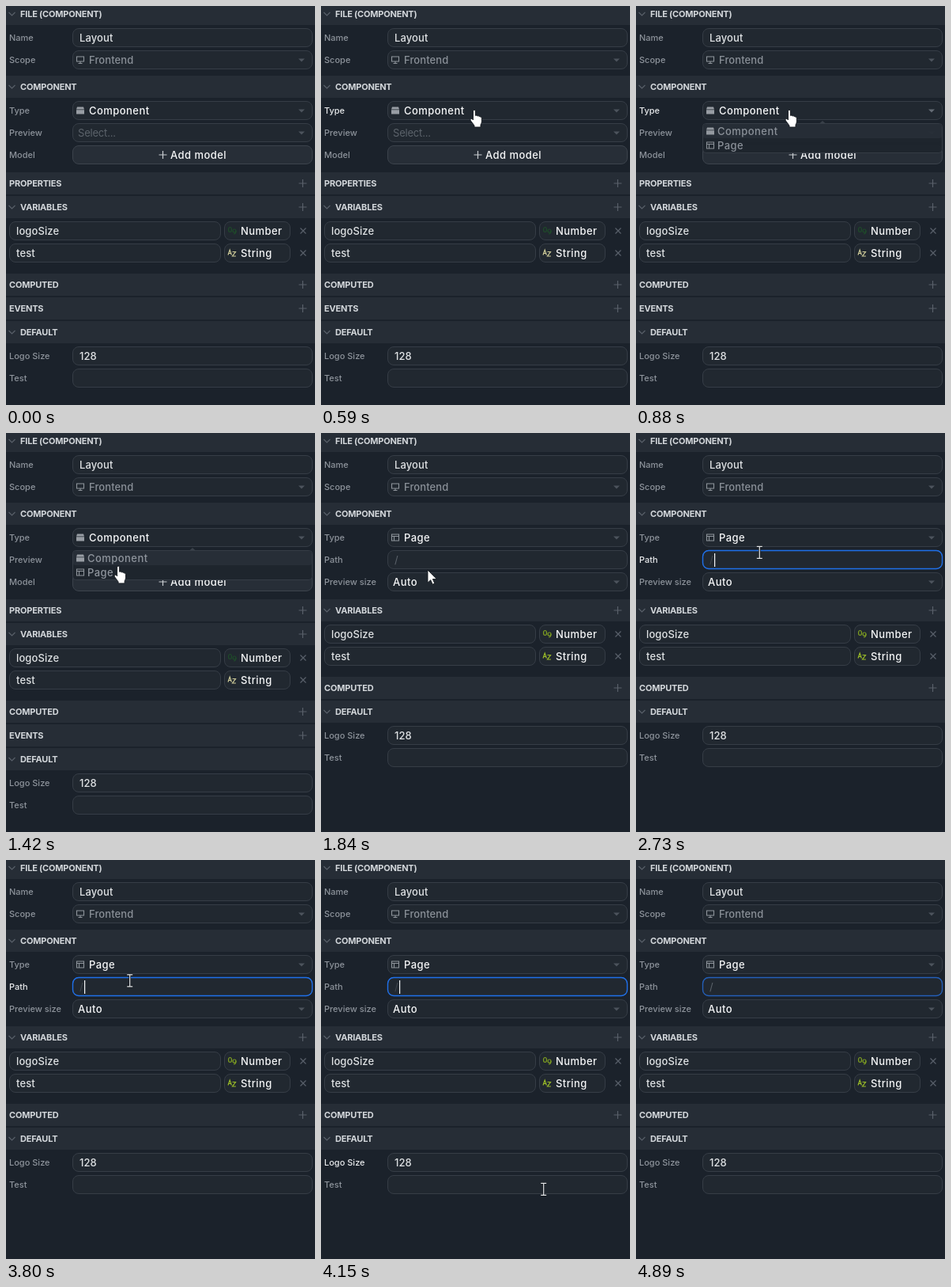
An HTML page for the animation above (4.96 s loop, 391 by 504 pixels).

```html
<!DOCTYPE html>
<html lang="en">
<head>
<meta charset="utf-8">
<title>Component settings</title>
<style>
html, body { margin: 0; width: 100%; height: 100%; overflow: hidden; background: #1b222b; }
svg { display: block; width: 391px; height: 504px; }
text { font: 500 13px Inter, "Open Sans", sans-serif; fill: #dfe2e4; letter-spacing: .1px; }
.head { font-size: 11px; font-weight: 700; fill: #d3d7db; letter-spacing: -.2px; }
.label { font-size: 11px; fill: #8d939b; letter-spacing: 0; }
.label.hot { fill: #e8eaec; }
.strong { fill: #f6f7f8; letter-spacing: .45px; }
.dim { fill: #8a9098; }
.option { fill: #8f959d; letter-spacing: .45px; }
.faint { font-weight: 400; fill: #5c636b; letter-spacing: -.2px; }
.box { fill: #212830; stroke: #363d46; }
.box.button { fill: #272e37; stroke: #3c434c; }
.line { fill: none; stroke: #59606a; stroke-width: 1.2; }
.pale { stroke: #c9cdd1; }
.icon { fill: none; stroke: #8f959c; stroke-width: 1.1; }
.skin { fill: #fff; stroke: #14181d; stroke-width: .9; }
</style>
</head>
<body>
<svg viewBox="0 0 391 504">
  <rect width="391" height="504" fill="#1b222b"/>
  <g id="shared"></g>
  <g id="component"></g>
  <g id="page"></g>
  <g id="menu"></g>
  <rect id="focus" x="84.5" y="148.5" width="303" height="23" rx="7.5" fill="none" stroke="#1f70ea" stroke-width="1.4"/>
  <rect id="caret" x="99" y="152" width="1.2" height="17" fill="#f4f6f7"/>
  <g id="cursor">
    <path id="arrow" class="skin" d="M0 0V16.2L3.7 12.7L6.2 18.2L8.8 17L6.4 11.6H11.4Z"/>
    <path id="hand" class="skin" d="M-1.5 1Q0-.7 1.5 1V7.4Q3.2 6.4 4.3 8Q6 7.3 7 8.9Q9.2 8.4 9.4 10.8V15Q9.2 17.4 8 19V22H0V20L-4.6 13.8Q-5.6 11.8-4 11.2Q-2.8 11-1.5 13Z"/>
    <g id="beam" fill="none">
      <path d="M-3.5-7.5H3.5M0-7.5V7.5M-3.5 7.5H3.5" stroke="#14181d" stroke-width="2.6"/>
      <path d="M-3.5-7.5H3.5M0-7.5V7.5M-3.5 7.5H3.5" stroke="#e3e6e9" stroke-width="1.2"/>
    </g>
  </g>
</svg>
<script>
const LOOP = 4960, STEP = 70, PHASE = 20;
const OPEN = 660, SWITCH = 1700, FOCUS = 2460, CARET = 2730, BLINK = 535, BLUR = 4780;
const $ = id => document.getElementById(id);
const clamp = v => Math.min(1, Math.max(0, v));
const ease = u => u < .5 ? 4 * u ** 3 : 1 - 4 * (1 - u) ** 3;

// Drawing helpers, all placed by the middle line of their row
const text = (x, cy, s, cls = '') =>
  `<text x="${x}" y="${cy + (/head|label/.test(cls) ? 4 : 4.6)}" class="${cls}">${s}</text>`;
const line = (d, cls = '') => `<path class="line ${cls}" d="${d}"/>`;
const plus = (x, y, cls) => line(`M${x - 5} ${y}h10M${x} ${y - 5}v10`, cls);
const cross = y => line(`M372.5 ${y - 3.5}l7 7m0-7l-7 7`);
const triangle = y => `<path class="tri" d="M370 ${y - 1.5}h8l-4 4z" fill="#4c535c"/>`;

const icons = {
  screen: y => `<path class="icon" d="M89.5 ${y - 4}h9v6h-9zM94 ${y + 2}v2.5m-2.5 0h5"/>`,
  parts: y => `<path d="M90 ${y - 4.5}h8l1 3h-10zM89 ${y - .8}h10v5.3h-10z" fill="#989da4"/>`,
  page: y => `<path class="icon" d="M89.5 ${y - 4}h9v8h-9zm0 2.5h9m-6 0v5.5"/>`,
  Number: y => `<ellipse cx="283.5" cy="${y - 1.5}" rx="2" ry="3"/><circle cx="289" cy="${y}" r="2"/><path d="M291 ${y}q0 4-3 4"/>`,
  String: y => `<path d="M281 ${y + 2.5}l2.2-6.5l2.2 6.5m-3.6-2h2.8M286.5 ${y - 1.5}h4l-4 5.5h4.4"/>`
};

const hits = [];
const box = (group, cy, kind, x = 84, end = 388) => {
  hits.push({ group, cy, kind, x, end });
  return `<rect class="box ${kind}" x="${x + .5}" y="${cy - 11.5}" width="${end - x - 1}" height="23" rx="7.5"/>`;
};
const head = (cy, title, fold, add) =>
  `<rect y="${cy - 14}" width="391" height="28" fill="#262d36"/>` +
  (fold ? line(`M3.5 ${cy - 2}l4 4l4-4`) : '') +
  text(fold ? 18 : 4, cy, title, 'head') + (add ? plus(375.5, cy) : '');

const field = (label, kind, content = () => '') => (group, cy) =>
  text(4, cy, label, 'label') + box(group, cy, kind) + content(cy) + (kind === 'select' ? triangle(cy) : '');
const choice = (icon, value, cls = 'strong') => cy => icons[icon](cy) + text(105, cy, value, cls);
const value = (s, x = 93, cls = '') => cy => text(x, cy, s, cls);
const variable = (name, type, color) => (group, cy) =>
  box(group, cy, 'text', 4, 272) + text(13, cy, name) + box(group, cy, 'select', 276, 360) +
  `<g fill="none" stroke="${color}" stroke-width="1.2">${icons[type](cy)}</g>` +
  text(297, cy, type, 'strong') + cross(cy);

const section = (group, top, title, rows, add) => {
  $(group).innerHTML += head(top, title, rows.length > 0, add) +
    rows.map((row, i) => row(group, top + 30 + 28 * i)).join('');
};
const variables = (group, top, numberColor, stringColor) => section(group, top, 'VARIABLES', [
  variable('logoSize', 'Number', numberColor),
  variable('test', 'String', stringColor)
], true);
const defaults = (group, top) => section(group, top, 'DEFAULT', [
  field('Logo Size', 'text', value('128')),
  field('Test', 'text')
]);

section('shared', 10, 'FILE (COMPONENT)', [
  field('Name', 'text', value('Layout')),
  field('Scope', 'select', choice('screen', 'Frontend', 'dim'))
]);

section('component', 102, 'COMPONENT', [
  field('Type', 'select', choice('parts', 'Component')),
  field('Preview', 'select', value('Select...', 91, 'faint')),
  field('Model', 'button', cy => plus(198.5, cy, 'pale') + text(208, cy, 'Add model', 'strong'))
]);
section('component', 224, 'PROPERTIES', [], true);
variables('component', 254, '#1f4a2a', '#cfcc9a');
section('component', 352, 'COMPUTED', [], true);
section('component', 382, 'EVENTS', [], true);
defaults('component', 412);

section('page', 102, 'COMPONENT', [
  field('Type', 'select', choice('page', 'Page')),
  field('Path', 'text', cy => `<g id="slash">${text(93, cy, '/', 'faint')}</g>`),
  field('Preview size', 'select', value('Auto', 91, 'strong'))
]);
variables('page', 224, '#7c9c22', '#9abb28');
section('page', 322, 'COMPUTED', [], true);
defaults('page', 352);

$('menu').innerHTML =
  '<path d="M231.5 149l4.5-4l4.5 4z" fill="#3a414a"/>' +
  '<rect x="84.5" y="148.5" width="303" height="37" rx="4" fill="#1e252d" stroke="#363d46"/>' +
  '<rect x="85" y="149" width="302" height="18" rx="3" fill="#272e37"/>' +
  icons.parts(158) + text(103, 158, 'Component', 'option') +
  icons.page(176) + text(103, 176, 'Page', 'option');

const labels = ['shared', 'component', 'page'].flatMap(group =>
  [...$(group).querySelectorAll('.label')].map(el => ({ el, group, cy: el.getAttribute('y') - 4 })));
const typeArrow = $('component').querySelector('.tri');

// Pointer stops, with an eased glide between each pair
const stops = [
  { t: 50, x: 322, y: 512 },
  { t: 590, x: 194, y: 131 }, { t: 1070, x: 194, y: 131 },
  { t: 1578, x: 135, y: 173 }, { t: 1970, x: 135, y: 173 },
  { t: 2250, x: 144, y: 189 }, { t: 2530, x: 160, y: 149 },
  { t: 2730, x: 156, y: 151 }, { t: 3730, x: 156, y: 151 },
  { t: 4448, x: 332, y: 522 }
];

function pointAt(t) {
  const i = stops.findIndex(s => s.t > t);
  if (i < 1) return stops[i ? stops.length - 1 : 0];
  const a = stops[i - 1], b = stops[i];
  const k = ease((t - a.t) / (b.t - a.t));
  return { x: a.x + (b.x - a.x) * k, y: a.y + (b.y - a.y) * k };
}

const inRow = (p, cy) => Math.abs(p.y - cy) <= 12;

function drawPointer(t, group, menuOpen) {
  const p = pointAt(t);
  const over = hits.find(h => (h.group === 'shared' || h.group === group) &&
    p.x >= h.x && p.x <= h.end && inRow(p, h.cy));
  let kind = 'arrow';
  if (menuOpen && p.y > 146) kind = 'hand';
  else if (over) kind = over.kind === 'text' ? 'beam' : 'hand';
  for (const id of ['arrow', 'hand', 'beam']) $(id).style.display = id === kind ? '' : 'none';
  $('cursor').style.display = p.y < 504 ? '' : 'none';
  $('cursor').setAttribute('transform', `translate(${p.x.toFixed(1)} ${p.y.toFixed(1)})`);

  // Row labels light up slightly behind the pointer
  const late = pointAt(t - 30);
  const covered = menuOpen && late.y > 146;
  for (const l of labels) l.el.classList.toggle('hot', !covered && inRow(late, l.cy));
}

function render(now) {
  const t = now - (now - PHASE + STEP) % STEP;
  const isPage = t >= SWITCH;
  const menuOpen = t >= OPEN && !isPage;
  $('component').style.display = isPage ? 'none' : '';
  $('page').style.display = isPage ? '' : 'none';

  $('menu').style.opacity = isPage ? clamp((SWITCH + 140 - t) / 280) : clamp((t - OPEN + STEP) / 280);
  typeArrow.setAttribute('fill', menuOpen && t < 1210 ? '#656c75' : '#4c535c');
  drawPointer(t, isPage ? 'page' : 'component', menuOpen);

  const focus = t < FOCUS ? 0 : 1 - .3 * clamp((t - BLUR) / STEP);
  $('focus').style.opacity = focus;
  $('slash').style.opacity = focus === 1 ? .5 : 1;
  const caretOn = now >= CARET && now < BLUR && (now - CARET) % (2 * BLINK) < BLINK;
  $('caret').style.display = caretOn ? '' : 'none';
}

const began = performance.now();
function tick() {
  render((performance.now() - began) % LOOP);
  requestAnimationFrame(tick);
}
tick();
</script>
</body>
</html>
```
